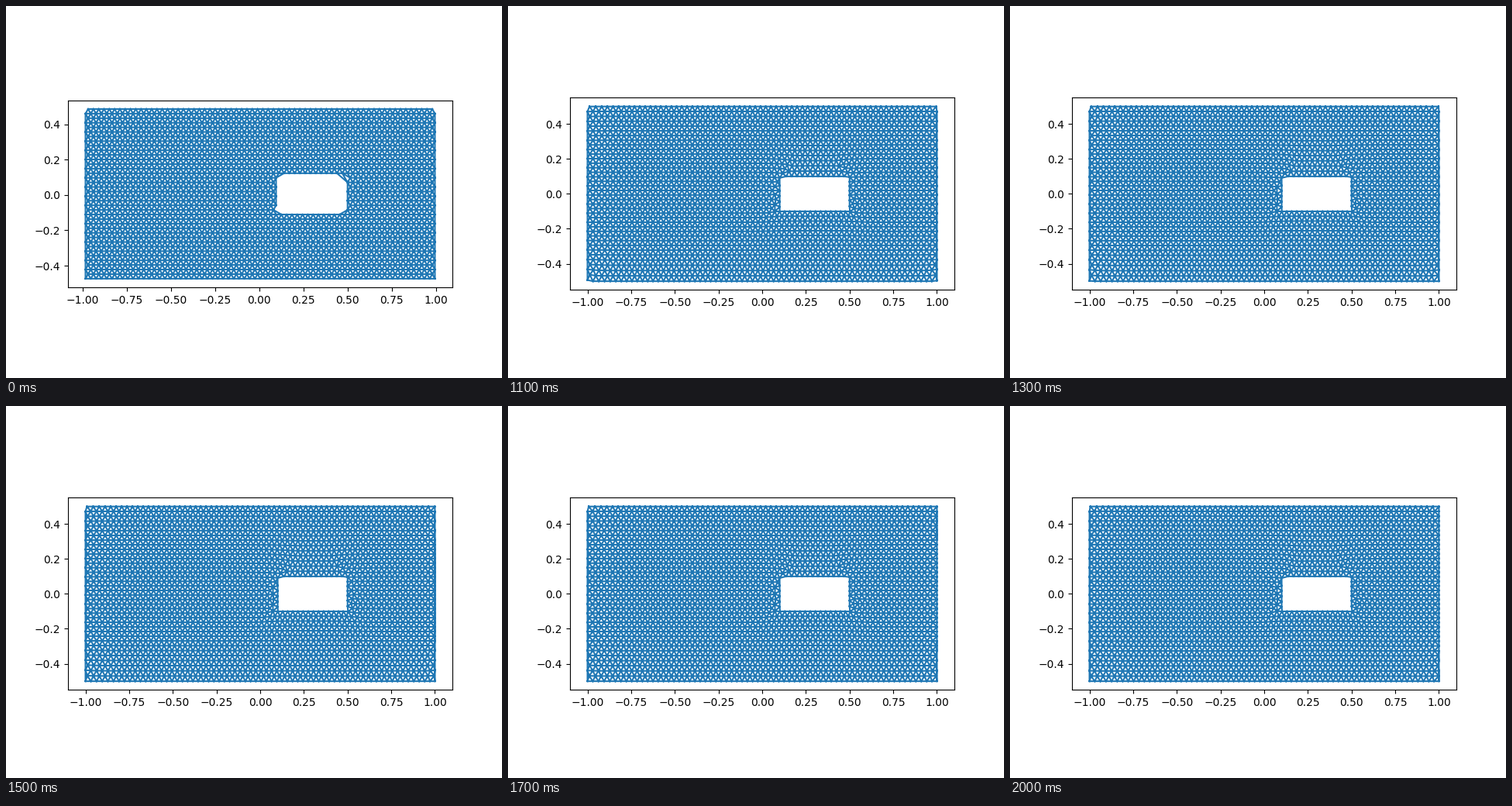
Animation of 640 by 480 pixels, one loop 2.1 s. Source, as a matplotlib script:

```python
import matplotlib.pyplot as plt
import numpy as np
from matplotlib.animation import FuncAnimation
from matplotlib.tri import Triangulation

H = 0.03                     # target edge length
OUTER = (-1, 1, -0.5, 0.5)   # plate
HOLE = (0.1, 0.5, -0.1, 0.1)
DT, SCALE, TTOL = 0.2, 1.2, 0.1
HOLD, SHOTS = 10, 11         # still frames, then relaxed meshes
WARMUP, STEPS = 30, 4        # relaxation steps before and between meshes


def box_dist(p, box):
    x0, x1, y0, y1 = box
    x, y = p[:, 0], p[:, 1]
    return -np.minimum(np.minimum(x - x0, x1 - x), np.minimum(y - y0, y1 - y))


def dist(p):
    """Signed distance to the plate with its hole, negative inside."""
    return np.maximum(box_dist(p, OUTER), -box_dist(p, HOLE))


def lattice():
    x, y = np.meshgrid(np.arange(-1, 1 + H, H),
                       np.arange(-0.5, 0.5 + H, H * np.sqrt(3) / 2))
    x[1::2] += H / 2
    p = np.column_stack([x.ravel(), y.ravel()])
    return p[dist(p) < 0]


def triangulate(p):
    tri = Triangulation(*p.T.copy())
    centers = p[tri.triangles].mean(axis=1)
    tri.set_mask(dist(centers) > -0.001 * H)
    return tri


def clip(p, rows, box):
    x0, x1, y0, y1 = box
    p[rows] = p[rows].clip((x0, y0), (x1, y1))


def to_side(p, rows, box):
    """Move points inside a box to its nearest side."""
    walls = np.array(box)
    for i in rows:
        side = np.argmin(np.abs(p[i, [0, 0, 1, 1]] - walls))
        p[i, side // 2] = walls[side]


def project(p):
    """Bring stray points back to the nearest wall."""
    clip(p, slice(None), OUTER)
    to_side(p, np.flatnonzero(box_dist(p, HOLE) < 0), HOLE)


def snap(p, tri):
    """Pull the rim of the mesh onto the walls."""
    row, col = np.nonzero((tri.neighbors < 0) & ~tri.mask[:, None])
    rim = np.unique([tri.triangles[row, col],
                     tri.triangles[row, (col + 1) % 3]])
    outer = -box_dist(p[rim], OUTER) < box_dist(p[rim], HOLE)
    to_side(p, rim[outer], OUTER)
    clip(p, rim[~outer], HOLE)


def push(p, bars):
    """Move every point one step along the repulsive bar forces."""
    a, b = bars.T
    vec = p[a] - p[b]
    length = np.maximum(np.hypot(vec[:, 0], vec[:, 1]), 1e-9)
    rest = SCALE * np.sqrt(np.mean(length ** 2))
    force = (np.maximum(rest - length, 0) / length)[:, None] * vec
    for k in (0, 1):
        total = (np.bincount(a, force[:, k], len(p))
                 - np.bincount(b, force[:, k], len(p)))
        p[:, k] += DT * total
    project(p)


def relax():
    p = lattice()
    meshes = [triangulate(p)]
    anchor = np.full_like(p, np.inf)
    for shot in range(SHOTS):
        for _ in range(STEPS if shot else WARMUP):
            if np.hypot(*(p - anchor).T).max() > TTOL * H:
                snap(p, triangulate(p))
                tri, anchor = triangulate(p), p.copy()
            push(p, tri.edges)
        meshes.append(triangulate(p))
    return meshes


meshes = relax()
fig, ax = plt.subplots(figsize=(6.4, 4.8), dpi=100)


def draw(i):
    ax.clear()
    ax.set_aspect("equal")
    return ax.triplot(meshes[max(0, i - HOLD + 1)])


anim = FuncAnimation(fig, draw, frames=HOLD + SHOTS, interval=100,
                     repeat=True, repeat_delay=0)
plt.show()
```
